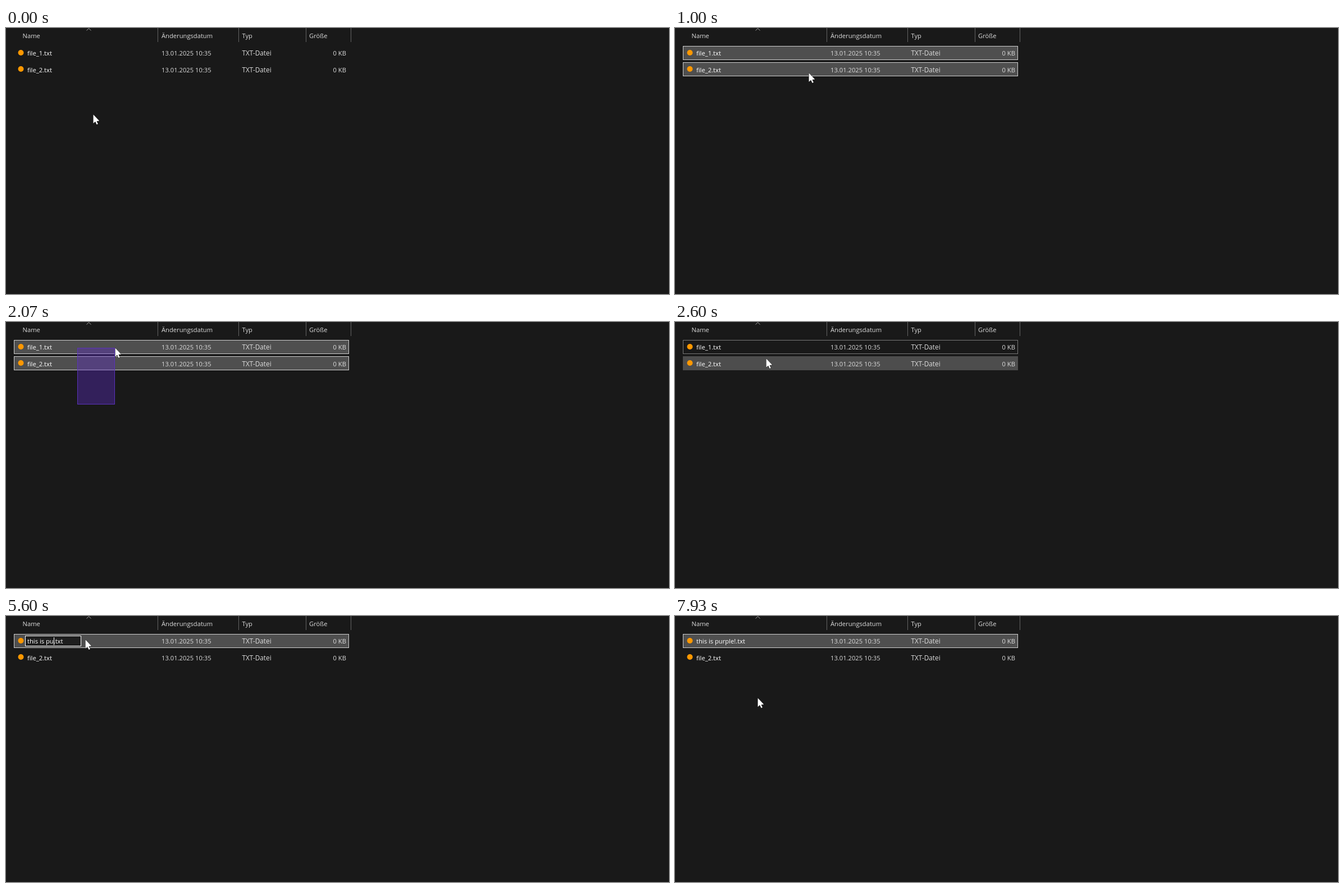
Write an HTML page with a canvas that moves like this. It is 1181 px wide and 474 px high and loops after 8 s.

```html
<!DOCTYPE html>
<html lang="de">
<head>
<meta charset="utf-8">
<title>Dateiliste</title>
<style>
  html, body { margin: 0; height: 100%; overflow: hidden; background: #191919; }
  canvas { display: block; }
</style>
</head>
<body>
<canvas id="stage" width="1181" height="474"></canvas>
<script>
const ctx = document.getElementById('stage').getContext('2d');
const LOOP = 8000, FPS = 15;

// Where the pointer turns
const TURNS = [
  { t: 0, x: 155, y: 154 },
  { t: 670, x: 246, y: 3 },
  { t: 1000, x: 238, y: 80 },
  { t: 1330, x: 127, y: 147 },
  { t: 1670, x: 157, y: 97 },
  { t: 2070, x: 194, y: 46 },
  { t: 2400, x: 170, y: 102 },
  { t: 2600, x: 162, y: 65 },
  { t: 2930, x: 141, y: 42 },
  { t: 7600, x: 141, y: 42 },
  { t: 7930, x: 147, y: 146 },
  { t: LOOP, x: 147, y: 146 }
];

const DRAGS = [
  { from: 70, to: 930, x: 155, y: 154 },
  { from: 1330, to: 2450, x: 127, y: 147 }
];
const DESELECT = 1270, PICK = 2930, EDIT = 3600, HOT = 6070, COMMIT = 7000, SETTLE = 7070;
const HIDE = 4530, SHOW = 5400; // the pointer hides while typing

const WORDS = 'this is purple';
const TYPE_START = 4060, KEY_MS = 170, BANG = 6800;

const ROW_H = 25, ROW_TOPS = [32, 61];

const lerp = (a, b, k) => a + (b - a) * k;
const ease = k => k * k * (3 - 2 * k);

function pointerAt(t) {
  const i = TURNS.findIndex(p => p.t > t);
  const a = TURNS[i - 1], b = TURNS[i];
  const k = ease((t - a.t) / (b.t - a.t));
  return [Math.round(lerp(a.x, b.x, k)), Math.round(lerp(a.y, b.y, k))];
}

function typedAt(t) {
  const count = Math.floor((t - TYPE_START) / KEY_MS) + 1;
  return WORDS.slice(0, Math.max(0, count)) + (t >= BANG ? '!' : '');
}

function text(str, x, y, color = '#dcdcdc', size = 11.2) {
  ctx.font = size + 'px "Open Sans", "Noto Sans", sans-serif';
  ctx.fillStyle = color;
  ctx.fillText(str, x, y);
}

function box(x, y, w, h, fill, stroke) {
  if (fill) {
    ctx.fillStyle = fill;
    ctx.fillRect(x, y, w, h);
  }
  if (stroke) {
    ctx.strokeStyle = stroke;
    ctx.lineWidth = 1;
    ctx.strokeRect(x + 0.5, y + 0.5, w - 1, h - 1);
  }
}

function poly(points, color, close) {
  ctx.beginPath();
  points.forEach(([x, y]) => ctx.lineTo(x, y));
  if (close) ctx.closePath();
  ctx.strokeStyle = color;
  ctx.lineWidth = 1;
  ctx.stroke();
}

function header() {
  const columns = [['Name', 29.5, 270], ['Änderungsdatum', 277, 414],
                   ['Typ', 420.5, 534], ['Größe', 540, 614]];
  columns.forEach(([label, x, end]) => {
    text(label, x, 18);
    box(end, 0, 1, 25, '#636363');
  });
  poly([[143.5, 4.5], [147.5, 0.8], [151.5, 4.5]], '#a0a0a0');
}

// Returns fill and border of a row
function rowStyle(i, t, y, drag) {
  const top = ROW_TOPS[i];
  const selected = ['#4f4f4f', '#cfcfcf'];
  const focus = i === 0 && t >= DESELECT ? '#777777' : null;
  if (t >= PICK) {
    if (i) return [];
    return t >= HOT && t < SETTLE ? ['#666666'] : selected;
  }
  if (drag) return y < top + ROW_H ? selected : [null, focus];
  if (t >= DRAGS[0].to && t < DESELECT) return selected;
  const hover = y >= top && y < top + ROW_H;
  return [hover ? '#4d4d4d' : null, focus];
}

function row(i, name, style) {
  const top = ROW_TOPS[i], base = top + 17 + i;
  box(14, top, 597, ROW_H, ...style);
  ctx.fillStyle = '#ff9800';
  ctx.beginPath();
  ctx.arc(26.5, top + 12, 5, 0, 7);
  ctx.fill();
  text(name, 38, base, '#ffffff');
  text('13.01.2025 10:35', 277, base);
  text('TXT-Datei', 420.5, base, '#dcdcdc', 11.8);
  text('0 KB', 582.5, base);
}

function editor(name, typed) {
  text('', 0, 0); // selects the font for measuring
  const width = str => Math.round(ctx.measureText(str).width);
  box(34, 35, width(name) + 37, 19, '#1e1e1e', '#ffffff');
  if (!typed) box(38, 37, width('file_1'), 15, '#5b2cbe');
  text(name, 38, 49, '#ffffff');
  if (typed) box(38 + width(typed), 38, 1, 14, '#ffffff');
}

function rubberBand(from, x, y) {
  const left = Math.min(from.x, x), top = Math.min(from.y, y);
  box(left, top, Math.abs(x - from.x), Math.abs(y - from.y),
      'rgba(91, 44, 190, 0.4)', '#5a32bc');
}

function arrow(x, y) {
  ctx.save();
  ctx.translate(x + 0.5, y + 0.3);
  ctx.lineJoin = 'round';
  poly([[0, 0], [0, 15.8], [3.6, 12.5], [6, 17.8], [8.4, 16.8], [6, 11.6], [10.8, 11.3]],
       '#000000', true);
  ctx.fillStyle = '#ffffff';
  ctx.fill();
  ctx.restore();
}

function beam(x, y) {
  box(x, y - 6, 1, 13, '#ffffff');
  for (const end of [y - 6, y + 6]) {
    box(x - 3, end, 3, 1, '#ffffff');
    box(x + 1, end, 3, 1, '#ffffff');
  }
}

function draw(t) {
  const [x, y] = pointerAt(t);
  const drag = DRAGS.find(d => t >= d.from && t < d.to);
  const typed = typedAt(t);
  const name = (typed || 'file_1') + '.txt';
  const editing = t >= EDIT && t < COMMIT;

  box(0, 0, 1181, 474, '#191919');
  header();
  [name, 'file_2.txt'].forEach((label, i) => row(i, label, rowStyle(i, t, y, drag)));
  if (editing) editor(name, typed);
  if (drag) rubberBand(drag, x, y);

  if (editing && t >= HOT) beam(145, 44);
  else if (t < HIDE || t >= SHOW) arrow(x, y);
}

// The picture advances in whole steps, rounded to 10 ms
function tick() {
  const t = performance.now() % LOOP;
  const step = Math.floor((t + 4) * FPS / 1000) % (LOOP * FPS / 1000);
  draw(Math.round(step * 100 / FPS) * 10);
  requestAnimationFrame(tick);
}
tick();
</script>
</body>
</html>
```
